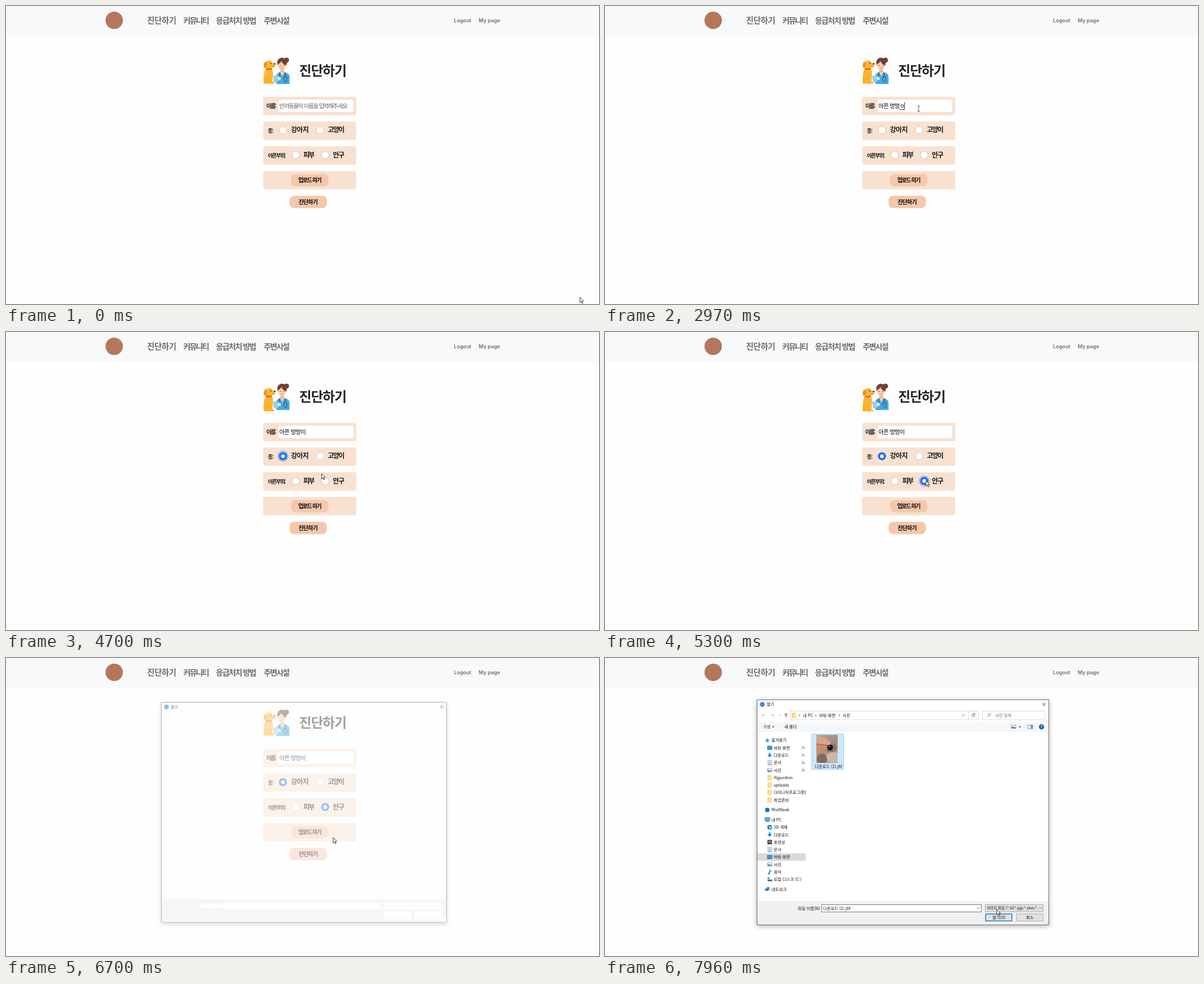
An HTML page that plays this animation: 1055 px wide and 531 px high, repeating every 8 s.

```html
<!DOCTYPE html>
<html lang="ko">
<head>
<meta charset="utf-8">
<title>진단하기</title>
<style>
  html, body { margin: 0; width: 100%; height: 100%; overflow: hidden; background: #fefefe; }
  svg { display: block; width: 1055px; height: 531px; }
  text { font-family: "Noto Sans CJK KR", "Noto Sans CJK", "Noto Sans CJK JP", sans-serif; white-space: pre; }
</style>
</head>
<body>
<svg id="stage" viewBox="0 0 1055 531"></svg>
<script>
const rect = (x, y, w, h, fill, extra = '') =>
  `<rect x="${x}" y="${y}" width="${w}" height="${h}" fill="${fill}" ${extra}/>`;
const oval = (x, y, rx, ry, fill, extra = '') =>
  `<ellipse cx="${x}" cy="${y}" rx="${rx}" ry="${ry}" fill="${fill}" ${extra}/>`;
const dot = (x, y, r, fill, extra) => oval(x, y, r, r, fill, extra);
const path = (d, fill, extra = '') => `<path d="${d}" fill="${fill}" ${extra}/>`;
const line = (d, color, width = 1) =>
  path(d, 'none', `stroke="${color}" stroke-width="${width}" stroke-linecap="round" stroke-linejoin="round"`);
// y is the vertical middle of the letters
const text = (x, y, str, size, { color = '#000', weight = 400, gap = 0, extra = '' } = {}) =>
  `<text x="${x}" y="${y + size * .37}" font-size="${size}" fill="${color}" font-weight="${weight}" letter-spacing="${gap}" ${extra}>${str}</text>`;
const bold = (x, y, str, size, gap, color = '#15181b') => text(x, y, str, size, { color, weight: 700, gap });

// ---------- web page ----------
function header() {
  const gray = '#6b6c6d';
  const latin = { color: gray, weight: 600, extra: 'style="font-family:Inter,sans-serif"' };
  return rect(0, 0, 1055, 53, '#f8f9fb') + dot(192.5, 25.5, 15.5, '#b5775c') +
    bold(251, 25.5, '진단하기', 14.5, -.4, gray) + bold(315.5, 25.5, '커뮤니티', 14, -1.7, gray) +
    bold(373.5, 25.5, '응급처치 방법', 14, -1.5, gray) + bold(458.5, 25.5, '주변시설', 14, -1.7, gray) +
    text(797, 25.5, 'Logout', 9.1, latin) + text(841, 25.5, 'My page', 9.1, latin);
}

function vetAndDog() {
  const vet =
    dot(499, 96.5, 4.5, '#70402f') + oval(491, 101, 8.5, 9, '#70402f') +
    rect(488, 111, 7, 9, '#f0b794') + oval(491, 106, 6.8, 8.5, '#fbd0b0') +
    path('M483 103Q485 95 491 97Q499 98 499 106Q492 104 490 98Q488 103 483 103Z', '#70402f') +
    dot(488, 106, .8, '#4b2c25') + dot(494, 106, .8, '#4b2c25') + line('M489 110.5Q491 112 493 110.5', '#d9655b', .8) +
    path('M481 139V124Q482 119 488 118L491.5 122L495 118Q504 119 504.5 126V139Z', '#4ba9dc') +
    path('M488 118L491.5 125L495 118Z', '#fbd0b0') +
    line('M487 118.5V126M497 118.5V125Q494 126 494 131M497 125Q500 126 500 131', '#2c4a63', 1.2) +
    dot(487, 128, 1.5, '#d8e6ee', 'stroke="#2c4a63"') + rect(494, 132, 7, 4, '#3690c4');
  const dog =
    path('M462 110Q458 120 458 136Q458 138.5 461 138.5H477Q478 135 474 134.5L475 121Q475 114 472 109Z', '#fdb62f') +
    line('M468 137V126M461 136Q461 130 466 129', '#e69425', 1) +
    path('M461 103Q462 97 469 97Q473 97 474 101L479 103Q480 108 474 109L472 112H462Z', '#fdb62f') +
    path('M461 99Q457 105 459 110Q464 112 465 102Z', '#ec9727') +
    line('M463 111.5Q467 114 472 111.5', '#e9483e', 2) +
    dot(471, 102.5, 1, '#3b2a22') + oval(478, 103, 1.6, 1.3, '#3b2a22') + line('M474 108.5Q477 109 478 107', '#c3523b', 1);
  const hand = path('M475 124H483L488 130L482 136H477Z', '#8fd0f0') + dot(486, 129, 3, '#d5eefa');
  return vet + `<g id="dog">${dog}</g>` + hand;
}

const radio = (id, x, y) =>
  dot(x, y, 10, '#0d6efd', `id="${id}Ring" opacity=".32"`) +
  dot(x, y, 6.7, '#fff', 'stroke="#c3bcb7" stroke-width=".9"') +
  `<g id="${id}On">${dot(x, y, 7.1, '#0d6efd')}${dot(x, y, 3.4, '#fff')}</g>`;

function form() {
  const panels = [161.7, 205.8, 250, 294].map(y => rect(457.6, y, 165.6, 32.8, '#f9e1d0', 'rx="3"')).join('');
  return bold(521.5, 115, '진단하기', 24, -1.2, '#212529') + panels +
    bold(463, 178, '이름:', 10, -1.8) + rect(485, 167, 133, 22, '#fff', 'rx="3"') +
    text(486.3, 177.7, '반려동물의 이름을 입력해주세요', 10.5, { color: '#62676c', gap: -1.3, extra: 'id="hint"' }) +
    text(486.3, 177.7, '', 10.5, { gap: -.8, weight: 500, extra: 'id="typed"' }) +
    rect(0, 184.2, 0, .9, '#111', 'id="compose"') + rect(0, 171.5, .9, 13, '#111', 'id="caret"') +
    bold(466, 222.5, '종:', 9, -1) + radio('dogRadio', 492.7, 221.3) + bold(507, 221, '강아지', 12, -.7) +
    radio('catRadio', 559, 221.3) + bold(572.5, 221, '고양이', 12, -1.5) +
    bold(466, 266.5, '아픈부위:', 9.6, -1.6) + radio('skinRadio', 515.4, 265.5) + bold(529, 265.3, '피부', 12, -1.8) +
    radio('eyeRadio', 568, 265.5) + bold(581.5, 265.3, '안구', 12, -1.4) +
    rect(507.3, 299.4, 66.4, 22, '#f5c7ab', 'rx="8"') + bold(520, 310.5, '업로드 하기', 10, -1.4, '#000') +
    rect(504.5, 338.2, 66.4, 22, '#f5c7ab', 'rx="8"') + bold(520.5, 349.3, '진단하기', 10, -.8, '#000');
}

// ---------- file dialog ----------
const label = (x, y, str, color = '#111', size = 7.3) => text(x, y, str, size, { color });
const chevron = (x, y, color = '#555') => line(`M${x - 2} ${y - 1}l2 2l2-2`, color, .9);
const triangle = (x, y) => path(`M${x - 2.2} ${y - 1}h4.4l-2.2 2.4z`, '#333');

const icons = {
  star: (x, y) => path(`M${x} ${y - 4}l1.2 2.8l3 .2l-2.3 2l.8 3l-2.7-1.6l-2.7 1.6l.8-3l-2.3-2l3-.2z`, '#2f9be6'),
  desktop: (x, y) => rect(x - 4.5, y - 3.5, 9, 7, '#1581d8') + rect(x - 3.5, y - 2.5, 7, 4, '#2b9cf0'),
  down: (x, y) => path(`M${x - 1.5} ${y - 4}h3v3.5h2.7l-4.2 4.5l-4.2-4.5h2.7z`, '#2389dc'),
  doc: (x, y) => rect(x - 3, y - 4, 6.5, 8, '#fff', 'stroke="#7d8da0" stroke-width=".8"') + line(`M${x - 1.5} ${y - 1.5}h3.5m-3.5 2h3.5m-3.5 2h3.5`, '#3d8ccc', .8),
  picture: (x, y) => rect(x - 4, y - 3, 8, 6, '#eef4f8', 'stroke="#8496a5" stroke-width=".8"') + path(`M${x - 3.4} ${y + 2.3}v-3l3 1.5h3.8v1.5z`, '#2f6f9f'),
  folder: (x, y) => rect(x - 3.8, y - 4.2, 7.8, 8.6, '#f5ce62', 'rx=".5"') + rect(x - 2.4, y - 3.4, 6.4, 7.8, '#fde08b'),
  cloud: (x, y) => dot(x, y, 4, '#0f74cf'),
  pc: (x, y) => rect(x - 4, y - 4, 8.5, 6, '#53b6ee', 'stroke="#4a6a85" stroke-width=".8"') + line(`M${x - 2} ${y + 3.5}h4.5`, '#4a6a85', 1),
  cube: (x, y) => path(`M${x - 4} ${y - 3}l4-1.2l4 1.2v6l-4 1.5l-4-1.5z`, '#1686d9') + rect(x - 1, y - 1.5, 3.5, 4, '#9bdcf8'),
  video: (x, y) => rect(x - 4, y - 4, 8, 8, '#424a55') + rect(x - 2.3, y - 2.5, 4.6, 4, '#a08474'),
  music: (x, y) => line(`M${x} ${y + 2.5}v-6q.5 2.5 2.5 3`, '#1788dd', 1.3) + oval(x - 1.3, y + 2.8, 1.9, 1.5, '#1788dd'),
  disk: (x, y) => rect(x - 3.5, y + .5, 8, 3, '#59636d') + rect(x - 4, y - 3.5, 3.5, 3, '#2c9be8'),
  network: (x, y) => rect(x - 1, y - 4, 5, 5, '#3f9fe0') + path(`M${x - 4} ${y - 1}h4v-1.5l3 3.2l-3 3.2v-1.5h-4z`, '#2470ad'),
};

const places = [
  [146.5, 'star', '즐겨찾기'], [160, 'desktop', '바탕 화면'], [173.3, 'down', '다운로드'], [186.7, 'doc', '문서'],
  [200, 'picture', '사진'], [213.2, 'folder', 'Algorithm'], [226.5, 'folder', 'uploads'],
  [239.7, 'folder', '다이나믹프로그래밍'], [253, 'folder', '취업준비'], [270.7, 'cloud', 'MistNook'],
  [288.2, 'pc', '내 PC'], [301.5, 'cube', '3D 개체'], [314.8, 'down', '다운로드'], [328, 'video', '동영상'],
  [341.4, 'doc', '문서'], [354.6, 'desktop', '바탕 화면'], [367.8, 'picture', '사진'], [381, 'music', '음악'],
  [394.3, 'disk', '로컬 디스크 (C:)'], [412, 'network', '네트워크'],
];
const rootIcons = ['star', 'cloud', 'pc', 'network'];

function sidebar() {
  const rows = places.map(([y, icon, name]) => {
    const x = rootIcons.includes(icon) ? 296 : 300.3;
    return icons[icon](x - 7.3, y) + label(x, y, name);
  }).join('');
  const pins = [160, 173.3, 186.7, 200]
    .map(y => line(`M350 ${y + 2.5}l2-2m-1-2l3 3m-1.5-4l3 3l-2 .8l-1.6-1.6z`, '#737a80', .8)).join('');
  return rect(271, 348, 86, 13.3, '#d9d9d9') + `<g clip-path="url(#side)">${rows}</g>` + pins;
}

function photo() {
  return `<g clip-path="url(#photo)">` + rect(376, 137, 38, 50, 'url(#fur)') +
    oval(407, 177, 14, 9, '#c9b8a8') + oval(386, 180, 9, 10, '#7f6a5d') + oval(402, 160, 11, 8, '#8d7668') +
    path('M376 139Q390 138 400 149Q404 154 399 156L376 152Z', '#d9a486') +
    path('M376 153L393 156Q400 160 394 164L376 172Z', '#c88e70') + line('M376 153L396 156', '#8d5844', 1) +
    dot(400.5, 159.5, 5.2, '#17181b') + dot(399, 157.5, 1.2, '#8593a0') + `</g>`;
}

function dialogContents() {
  const gray = '#b8b8b8', box = 'stroke="#d9d9d9" stroke-width="1"', edge = 'stroke="#adadad" stroke-width="1"';
  const crumbs = [[352, '내 PC'], [381, '바탕 화면'], [422.7, '사진']]
    .map(([x, name]) => line(`M${x - 6.5} 100.5l1.5 1.7l-1.5 1.7`, '#444', .9) + label(x, 102, name)).join('');
  return line('M285 102h-6m2.5-2.5l-2.5 2.5l2.5 2.5M295 102h6m-2.5-2.5l2.5 2.5l-2.5 2.5', gray, .9) + chevron(311, 102, gray) +
    line('M322 105.5v-6.5m-2.5 2.5l2.5-2.5l2.5 2.5', '#444', 1) +
    rect(330, 94.5, 334.5, 15.5, '#fff', box) + line('M646.5 95V110', '#d9d9d9') + icons.folder(336, 102) + crumbs +
    chevron(637.5, 102) + line('M657.5 100.5a2.6 2.6 0 1 0 .5 2.2M657.8 98.8v2h-2', '#444', .9) +
    rect(671.5, 94.5, 111, 15.5, '#fff', box) + dot(684, 101, 2.1, 'none', 'stroke="#777" stroke-width=".8"') +
    line('M682.4 102.8l-2.4 2.4', '#777', .8) + label(694, 102, '사진 검색', '#6b6b6b') +
    rect(271, 114.5, 518, 17, '#f5f6f7') + label(281, 122.7, '구성') + triangle(299, 122.7) + label(319, 122.7, '새 폴더') +
    icons.picture(727, 122.7) + triangle(738, 122.7) +
    rect(752.5, 119.5, 8.5, 6.5, '#fff', 'stroke="#5a6d7d" stroke-width=".8"') + rect(757.5, 120, 3, 5.5, '#3a9be0') +
    dot(776.6, 122.7, 4.6, '#0c66b8') + text(774.8, 122.5, '?', 7, { color: '#fff', weight: 700 }) +
    sidebar() +
    rect(367.5, 135.5, 57, 63, '#cce8ff', 'id="fileMark" stroke-width="1"') + photo() + label(373.3, 193, '다운로드 (1).jfif') +
    rect(271, 433.5, 518, 41.5, '#f0f0f0') + label(343, 446, '파일 이름(N):') +
    rect(385.5, 439.5, 284, 13, '#fff', 'id="nameField"') + chevron(664.5, 446) +
    label(388, 446, '', '#111').replace('<text', '<text id="fileName"') + rect(388, 441.5, .8, 9, '#000', 'id="nameCaret"') +
    rect(676.5, 439.5, 103, 12.5, '#e1e1e1', edge) + label(679, 445.8, '이미지 파일 (*.tif;*.pjp;*.xbm;*.', '#111', 6.6) + chevron(775, 445.8) +
    rect(677.2, 456.2, 46.6, 12.3, '#e1e1e1', 'stroke="#0078d7" stroke-width="1.4"') + label(689, 462.3, '열기(O)') +
    rect(732, 456, 47.5, 12.8, '#e1e1e1', edge) + label(749, 462.3, '취소') +
    line('M788 469.5l-4.5 4.5M788 472.5l-1.5 1.5', '#bbb', .9);
}

function dialog() {
  const blanks = [[342, 441, 41, 9], [385, 440, 285, 12], [676, 440, 104, 12], [676, 455, 49, 15], [731, 455, 49, 15], [780, 465, 9, 10]]
    .map(box => rect(...box, '#fff')).join('');
  return `<g id="dialog">` +
    rect(270.5, 74.5, 519, 401, '#fff', 'stroke="#707070" stroke-width="1" filter="url(#shadow)"') +
    dot(279.8, 82.7, 4.4, '#4285f4') + label(287.5, 82.5, '열기') + line('M778.5 80l5 5m0-5l-5 5', '#333', .9) +
    `<g id="blank">${rect(271, 433.5, 518, 41.5, '#f0f0f0')}${blanks}</g>` +
    `<g id="contents">${dialogContents()}</g></g>`;
}

const defs = `<defs>
  <filter id="shadow" x="-5%" y="-5%" width="110%" height="112%"><feDropShadow dx="0" dy="2" stdDeviation="4" flood-opacity=".3"/></filter>
  <clipPath id="side"><rect x="271" y="132" width="86.5" height="300"/></clipPath>
  <clipPath id="photo"><rect x="376" y="137" width="38" height="50"/></clipPath>
  <linearGradient id="fur" x2=".4" y2="1"><stop stop-color="#aaa49d"/><stop offset=".5" stop-color="#a48b79"/><stop offset="1" stop-color="#b8a291"/></linearGradient>
</defs>`;

const pointers =
  `<g id="arrow">${path('M0 0V9.6L2.3 7.5L3.8 10.9L5.2 10.3L3.7 7H6.6Z', '#fff', 'stroke="#111" stroke-width=".8"')}</g>` +
  `<g id="beam">${line('M-2-4.8h1.4l.6.6l.6-.6h1.4M0-4.2V4.2M-2 4.8h1.4l.6-.6l.6.6h1.4', '#222', .8)}</g>`;

const stage = document.getElementById('stage');
stage.innerHTML = defs + header() + vetAndDog() + form() + dialog() + pointers;
const el = id => document.getElementById(id);
const show = (id, on) => el(id).setAttribute('display', on ? 'inline' : 'none');
const set = (id, attrs) => { for (const key in attrs) el(id).setAttribute(key, attrs[key]); };

// ---------- timing ----------
const LOOP = 8000;
const route = [
  [70, 1021, 519], [420, 258, 22], [500, 258, 22], [840, 557, 183], [970, 558, 183], [3580, 558, 183], [3720, 563, 184],
  [4100, 490, 221], [4400, 490, 221], [4850, 586, 263], [5040, 571, 265], [5300, 571, 265], [5850, 563, 312],
  [6150, 563, 312], [6600, 582, 320], [6780, 582, 320], [6910, 574, 313], [7500, 397, 174], [7610, 397, 174], [7960, 697, 448],
];
const typing = [[1370, 'ㅇ'], [1770, '아'],
  ...['앞', '아프', '아픈', '아픈 ', '아픈 ㅁ', '아픈 머', '아픈 멍', '아픈 멍ㅁ', '아픈 멍머', '아픈 멍멍'].map((s, i) => [1970 + i * 88, s]),
  [2970, '아픈 멍멍ㅇ'], [3040, '아픈 멍멍이']];
const fading = [[6630, .15], [6700, .57], [6780, 1]];
const latest = (steps, t, initial) => steps.reduce((value, [at, next]) => t >= at ? next : value, initial);

function pointerAt(t) {
  const i = route.findIndex(([at]) => at > t);
  if (i < 0) return route[route.length - 1].slice(1);
  if (i === 0) return route[0].slice(1);
  const [t0, x0, y0] = route[i - 1], [t1, x1, y1] = route[i];
  const p = (t - t0) / (t1 - t0), ease = p * p * (3 - 2 * p);
  return [x0 + (x1 - x0) * ease, y0 + (y1 - y0) * ease];
}

function drawInput(t) {
  const value = latest(typing, t, ''), node = el('typed'), focused = t >= 840 && t < 4240;
  if (node.textContent !== value) node.textContent = value;
  const end = 486.3 + (value ? node.getComputedTextLength() : 0);
  const composing = focused && value && !value.endsWith(' ');
  show('hint', !value);
  show('caret', focused);
  set('caret', { x: end - .3 });
  show('compose', composing);
  if (composing) {
    const start = node.getStartPositionOfChar(value.length - 1).x;
    set('compose', { x: start, width: Math.max(0, end - start) });
  }
}

function drawRadios(t) {
  const dogPicked = 4300, eyePicked = 5040;
  for (const id of ['catRadio', 'skinRadio']) { show(id + 'On', false); show(id + 'Ring', false); }
  show('dogRadioOn', t >= dogPicked);
  show('dogRadioRing', t >= dogPicked && t < eyePicked);
  show('eyeRadioOn', t >= eyePicked);
  show('eyeRadioRing', t >= eyePicked && t < 5900);
}

function drawDialog(t, x, y) {
  const opacity = latest(fading, t, 0), scale = 1 - .053 * (1 - opacity);
  show('dialog', opacity > 0);
  set('dialog', { opacity, transform: `translate(530 275) scale(${scale}) translate(-530 -275)` });
  show('blank', opacity < 1);
  show('contents', opacity === 1);
  const selected = t >= 7560, named = t >= 7630;
  const hovered = x > 367 && x < 425 && y > 135 && y < 199;
  show('fileMark', selected || hovered);
  set('fileMark', { fill: selected ? '#cce8ff' : '#e5f3ff', stroke: selected ? '#99d1ff' : '#e5f3ff' });
  set('nameField', { stroke: named ? '#7a7a7a' : '#0078d7' });
  el('fileName').textContent = named ? '다운로드 (1).jfif' : '';
  show('nameCaret', !named);
}

function draw(t) {
  const [x, y] = pointerAt(t);
  const overInput = t < 6630 && x > 485 && x < 618 && y > 167 && y < 189;
  show('arrow', !overInput);
  show('beam', overInput);
  set(overInput ? 'beam' : 'arrow', { transform: `translate(${x} ${y})` });
  const nod = t > 4300 && t < 5633 ? 1.5 * (1 - Math.cos((t - 4300) / 1000 * 3 * Math.PI)) : 0;
  set('dog', { transform: `translate(0 ${nod})` });
  drawInput(t);
  drawRadios(t);
  drawDialog(t, x, y);
}

const begin = performance.now();
function tick() {
  draw((performance.now() - begin) % LOOP);
  requestAnimationFrame(tick);
}
tick();
</script>
</body>
</html>
```
